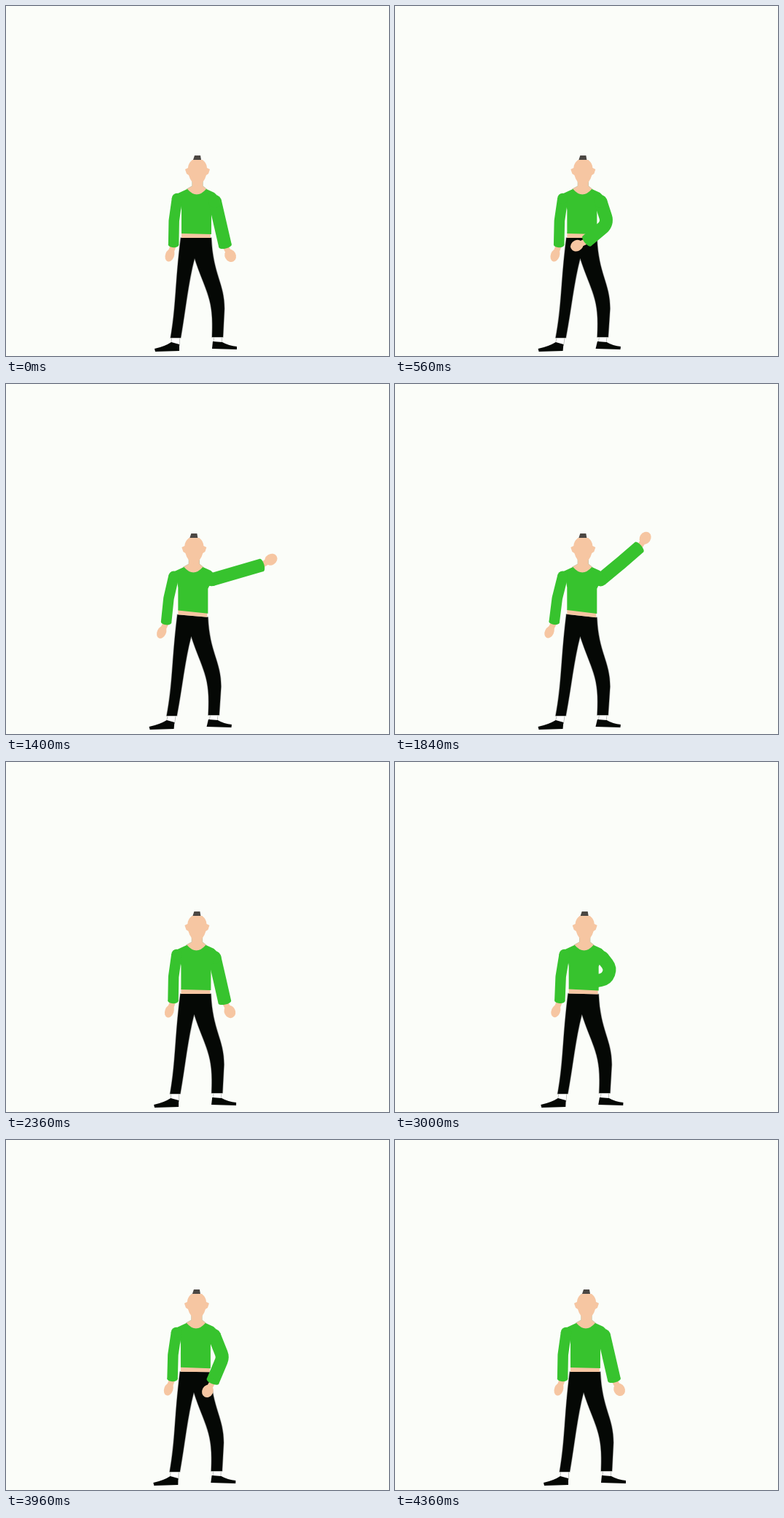
Write an HTML page with a canvas that moves like this. It is 526 by 480 pixels and loops after 4.46 s.

```html
<!DOCTYPE html>
<html lang="en">
<head>
<meta charset="utf-8">
<title>Arm exercise</title>
<style>
html, body { margin: 0; width: 100%; height: 100%; overflow: hidden; background: #fbfdf9; }
canvas { display: block; }
</style>
</head>
<body>
<canvas id="stage" width="526" height="480"></canvas>
<script>
const ctx = document.getElementById('stage').getContext('2d');
const LOOP = 4460, REST = 4360, RAD = Math.PI / 180;
const GREEN = '#37c32e', SKIN = '#f6c6a2', BLACK = '#050805', EDGE = '#a9aca8';

// Poses: time, sway, upper arm angle, forearm angle
const POSES = [
  [0, 0, 77, 77],
  [560, -8, 72, 140],        // hand on belly
  [1120, -9.5, 53, 45],
  [1400, -8, -16, -16],      // arm out
  [1700, -9, -55, -52],      // arm up
  [2360, -1, 77, 77],
  [3000, -4, 52, 169],       // hand on hip
  [3340, -8, 66, 165],
  [3640, -4.5, 62, 150],
  [REST, 0, 77, 77]
];

const rate = (a, b, c) => (b[c] - a[c]) / (b[0] - a[0]);

function slope(i, c) {
  if (i === 0 || i === POSES.length - 1) return 0;
  const m = rate(POSES[i - 1], POSES[i], c), n = rate(POSES[i], POSES[i + 1], c);
  return m * n <= 0 ? 0 : 2 * m * n / (m + n);
}

// Cubic interpolation that never overshoots a pose
function poseAt(t) {
  const i = t < REST ? POSES.findIndex(p => p[0] > t) - 1 : POSES.length - 2;
  const a = POSES[i], b = POSES[i + 1], span = b[0] - a[0];
  const u = Math.min(1, (t - a[0]) / span), v = 1 - u;
  return [1, 2, 3].map(c => a[c] * v * v * (1 + 2 * u) + b[c] * u * u * (3 - 2 * u)
    + span * u * v * (v * slope(i, c) - u * slope(i + 1, c)));
}

let sway, lean;

// Everything sways, the feet most; the hip tilts with the lean
function warp(x, y) {
  const foot = Math.min(1, Math.max(0, (y - 450) / 20));
  const tilt = Math.max(0, 1 - Math.abs(y - 318) / 60) * lean * RAD;
  return [x + sway * (.58 + .35 * foot), y + (x - 261) * tilt];
}

function shape(fill, outline, edge) {
  const path = new Path2D(outline.replace(/([\d.]+) ([\d.]+)/g,
    (_, x, y) => warp(+x, +y).join(' ')));
  if (edge) {
    ctx.strokeStyle = edge;
    ctx.lineWidth = 1.4;
    ctx.stroke(path);
  }
  ctx.fillStyle = fill;
  ctx.fill(path);
}

function oval([x, y], rx, ry, angle, fill) {
  ctx.fillStyle = fill;
  ctx.beginPath();
  ctx.ellipse(x, y, rx, ry, angle * RAD, 0, 7);
  ctx.fill();
}

function legs() {
  shape('#fff', 'M228 453 L238 453 L238 465 L227 465 Z', EDGE);
  shape('#fff', 'M286 451 L296 451 L296 464 L286 464 Z', EDGE);
  shape(BLACK, 'M227 461 L238 464 L238 473 L205 474 L204 470 Q218 467 227 461 Z');
  shape(BLACK, 'M284 460 L297 461 Q306 466 317 467 L317 471 L283 470 Z');
  shape(BLACK, `M240 318 L282 318 C284 368 300 380 300 415 L298 454 L283 454
    C286 400 274 392 259 346 C250 380 247 415 240 455 L226 455 C234 410 232 380 240 318 Z`, EDGE);
}

function torso() {
  shape(SKIN, 'M241 310 L281 310 L281 318 L241 318 Z');
  shape(SKIN, 'M256 238 L270 238 L270 247 L275 251 Q262 266 249 251 L256 247 Z', '#c9c3a4');
  shape(GREEN, `M249 251 Q262 266 275 251 L286 256 Q294 262 288 268 L282 280 L282 313
    L241 312 L241 280 L239 266 L236 257 Z`);
}

function arm(shoulder, upper, upperLen, fore, foreLen, hand, width) {
  const step = ([x, y], deg, len) => [x + len * Math.cos(deg * RAD), y + len * Math.sin(deg * RAD)];
  const line = (color, w, from, ...rest) => {
    ctx.strokeStyle = color;
    ctx.lineWidth = w;
    ctx.beginPath();
    ctx.moveTo(...from);
    if (rest.length > 1) ctx.arcTo(...rest[0], ...rest[1], 14);
    ctx.lineTo(...rest[rest.length - 1]);
    ctx.stroke();
  };
  const elbow = step(shoulder, upper, upperLen), cuff = step(elbow, fore, foreLen);
  const palm = step(cuff, hand, 15);
  line(SKIN, 8, cuff, palm);
  oval(palm, 9, width * .42, hand, SKIN);
  line(GREEN, width, shoulder, elbow, cuff);
  oval(shoulder, width / 2, width / 2, 0, GREEN);
  oval(cuff, 3.5, width / 2, fore, GREEN);
}

function restingArm() {
  arm(warp(235, 264), 98 + lean, 31, 91 + lean, 33, 110 + lean, 14.5);
}

// The arm looks longer the further it points sideways
function movingArm(upper, fore) {
  const len = 30 + 6 * Math.cos(upper * RAD), bend = fore - upper;
  arm(warp(287, 268), upper, len, fore, len + Math.abs(bend) / 12, fore + .45 * bend - 15, 18);
}

function head() {
  shape(SKIN, `M256 211 L270 211 Q276 216 276 222 L280 224 L278 230 L275 232 Q272 243 263 247
    Q254 243 251 232 L248 230 L246 224 L250 222 Q250 216 256 211 Z`);
  shape('#4b4743', 'M259 205 L267 205 L268 211 L257 211 Z');
}

function frame() {
  const t = performance.now() % LOOP, inFront = t < 1400;
  const [s, upper, fore] = poseAt(t);
  sway = s;
  lean = (77 - upper) / 19;
  ctx.fillStyle = '#fbfdf9';
  ctx.fillRect(0, 0, 526, 480);
  legs();
  if (!inFront) movingArm(upper, fore);
  torso();
  restingArm();
  if (inFront) movingArm(upper, fore);
  head();
  requestAnimationFrame(frame);
}
frame();
</script>
</body>
</html>
```
